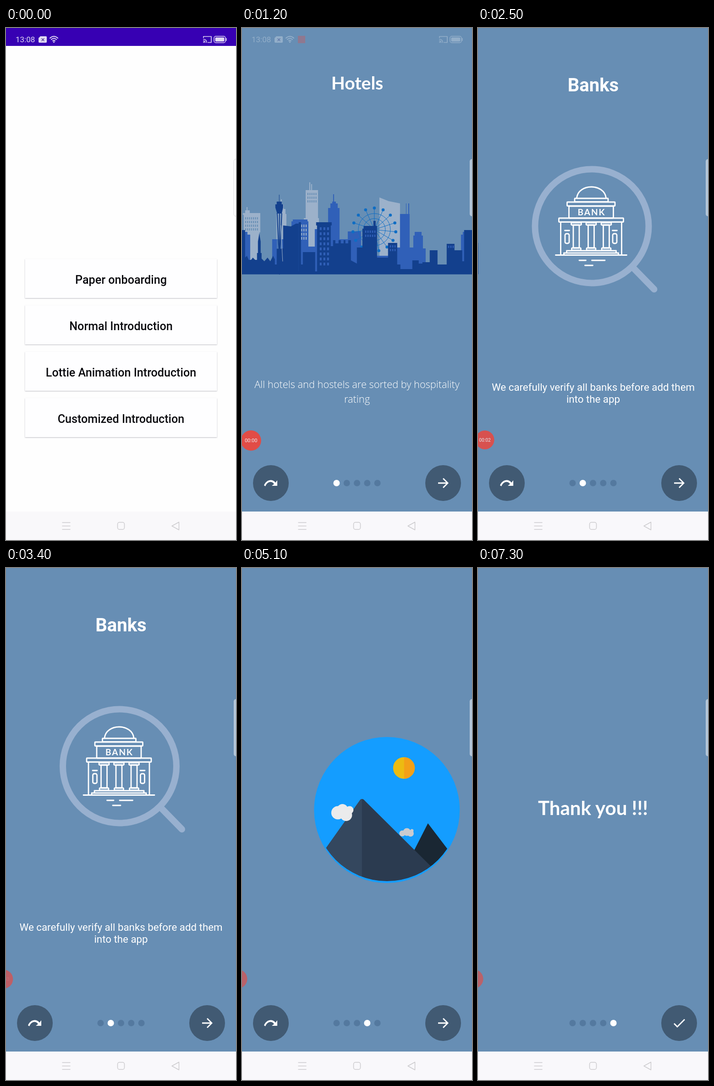
Write an HTML page that moves like this. It is 502 px wide and 1115 px high and loops after 8000 ms.

```html
<!DOCTYPE html>
<html lang="en">
<head>
<meta charset="utf-8">
<title>Onboarding</title>
<style>
  html, body { margin: 0; width: 100%; height: 100%; overflow: hidden; background: #fefefe; }
  svg { display: block; width: 100%; height: 100%; }
  text { font-family: Roboto, sans-serif; }
  .mid { text-anchor: middle; }
  .menu { font-size: 25.1px; font-weight: 500; fill: #0b0b0f; }
  .title { font: bold 40px Roboto, sans-serif; fill: #fff; }
  .hind { font-family: Lato, sans-serif; }
  .body { font-size: 22.3px; fill: #fff; }
  .light { font: 300 21.8px "Open Sans", sans-serif; fill: #fff; }
  .card { fill: #fefeff; filter: drop-shadow(0 1.5px 1.2px rgba(40, 40, 60, .32)); }
  .line { fill: none; stroke-linecap: round; stroke-linejoin: round; }
</style>
</head>
<body>
<svg id="stage" viewBox="0 0 502 1115" preserveAspectRatio="none"></svg>
<script>
const W = 502, LOOP = 8000, BLUE = '#678eb4';
const LIGHT = '#9cb1ca', MID = '#3060b8', DARK = '#13408d', WHEEL = '#0e6dc4';
const SCROLLS = [2050, 3850, 4900, 6090], SCROLL_MS = 600;

const $ = id => document.getElementById(id);
const clamp = v => Math.min(1, Math.max(0, v));
const span = (t, from, to) => clamp((t - from) / (to - from));
const easeOut = (p, power) => 1 - (1 - p) ** power;
const list = (n, fn) => Array.from({ length: n }, (_, i) => fn(i)).join('');

const rect = (x, y, w, h, fill, extra = '') =>
  `<rect x="${x}" y="${y}" width="${w}" height="${h}" fill="${fill}" ${extra}/>`;
const disc = (x, y, r, fill, extra = '') =>
  `<circle cx="${x}" cy="${y}" r="${r}" fill="${fill}" ${extra}/>`;
const line = (d, stroke, width, extra = '') =>
  `<path class="line" d="${d}" stroke="${stroke}" stroke-width="${width}" ${extra}/>`;
const shape = (d, fill) => `<path d="${d}" fill="${fill}"/>`;
const label = (x, y, cls, text) => `<text x="${x}" y="${y}" class="${cls}">${text}</text>`;
const grid = (x, y, cols, rows, dx, dy, w, h, fill) =>
  list(cols * rows, i => rect(x + i % cols * dx, y + Math.floor(i / cols) * dy, w, h, fill));

// Menu screen
function menuScreen() {
  const names = ['Paper onboarding', 'Normal Introduction',
    'Lottie Animation Introduction', 'Customized Introduction'];
  return rect(0, 0, W, 1115, '#fefefe') + rect(0, 0, W, 39, '#3700b3') +
    names.map((name, i) => {
      const y = 503 + i * 101;
      return rect(41.5, y, 419, 85, '#fefeff', 'class="card"') +
        (i === 2 ? rect(42, y, 418, 85, '#000', 'id="press" opacity="0"') : '') +
        label(251, y + 53.5, 'mid menu', name);
    }).join('') + rect(0, 1053, W, 62, '#f9f8fa');
}

// Skyline: three layers that wrap at the stage width
function farLayer() {
  return shape('M35 536V405H38V394H42V384H45V373H47V384H51V394H55V405H57V536Z' +
    'M95 536V414H99V353H107V336H109V353H111V340H113V353H126V414H128V536Z' +
    'M260 496V369L280 377L305 382V496Z' +
    'M463 536V445H466V407H464V403H469V397H472V390H474V397H479V403H502V445H500V536Z', LIGHT) +
    grid(103, 359, 5, 3, 4.4, 8, 2, 5, BLUE) + grid(469, 412, 7, 4, 4.3, 8, 2, 5, BLUE);
}

function midLayer() {
  const [cx, cy] = [228, 439];
  const rim = (i, r) => {
    const a = i * Math.PI * 2 / 15;
    return [cx + r * Math.sin(a), cy - r * Math.cos(a)];
  };
  return shape('M5 536V460H47V421H50V417H82V421H84V476H98V438H127V392H132V382H136V378H138V362H140' +
    'V378H144V382H148V392H152V460H170V443H199V496H268V478H284V405H297V382H298V405H302V382H304V405' +
    'H305V478H313V452H316V444H331V452H334V480H340V536H394V491H404V510H417V450H421V444H432V450' +
    'H437V444H453V450H459V536Z', MID) +
    grid(54, 428, 6, 4, 4.8, 9, 2.2, 6, LIGHT) +
    list(15, i => line(`M${cx} ${cy}L${rim(i, 47)}`, WHEEL, 1)) +
    [35, 24].map(r => disc(cx, cy, r, 'none', `stroke="${WHEEL}" stroke-width="1"`)).join('') +
    list(15, i => disc(...rim(i, 47), 3.3, WHEEL)) + disc(cx, cy, 4, WHEEL);
}

function nearLayer() {
  return shape('M0 536V423H5V515H9V488H36V530H40V430H38V423H72V430H70V475H75V462H80V469H87V462H92' +
    'V469H98V462H102V469H108V462H114V506L127 513V478H139V437H142V431H163V420H168V431H171V500H195V468' +
    'H215V515H222V525H248V506H262V513H270V510H286V484H303V515H323V470H340V484H357V508H361V440H385' +
    'V500L389 496L393 505H398L402 500L407 505H411V490H413V465L416 447L419 465V490H421V502L427 508' +
    'L434 500L440 508L446 496L450 504V515H454V480H468V430L485 432L496 426H502V536Z', DARK) +
    grid(46, 434, 3, 8, 8, 11, 4, 6, MID) + grid(145, 441, 5, 2, 5, 9, 2.5, 5, MID) +
    grid(199, 473, 3, 2, 5, 8, 2.5, 5, MID) + grid(326, 474, 3, 1, 5, 8, 2.5, 5, MID) +
    rect(454, 404, 12, 77, BLUE, 'opacity=".45"') +
    line('M455 404L458 470L462 510M465 404L462 470L458 510M460 404V536', DARK, 2) +
    line('M463 430L467 508', LIGHT, 1) +
    shape('M459 378V363H460V378H465V384H468V391L465 404H455L451 391V384H454V378Z', DARK);
}

function hotelsPage() {
  const layer = (id, content) => `<g id="${id}"><g id="${id}Tile">${content}</g>` +
    `<use href="#${id}Tile" x="${-W}"/></g>`;
  return `<g clip-path="url(#pageClip)">${layer('far', farLayer())}${layer('mid', midLayer())}` +
    `${layer('near', nearLayer())}${rect(0, 530, W, 6.5, DARK)}</g>` +
    `<text x="251.5" y="134" class="mid title hind" style="font-size:39px;font-family:Lato,sans-serif">Hotels</text>` +
    label(251, 784, 'mid light', 'All hotels and hostels are sorted by hospitality') +
    label(251, 816, 'mid light', 'rating');
}

function banksPage() {
  const box = (x, y, w, h, r = 1) => rect(x, y, w, h, 'none', `rx="${r}"`);
  const columns = [214, 246.5, 279.5].map(x =>
    box(x - 11, 424, 22, 5, 2) + box(x - 6.5, 429, 13, 50) + box(x - 10, 479, 20, 5, 2)).join('');
  const windows = [194, 298].map(x =>
    box(x - 4.5, 448, 9, 21, 3) + `<path d="M${x - 5} 441H${x + 5}"/>`).join('');
  return disc(248, 431.5, 124, 'none', 'stroke="#98b0cf" stroke-width="14"') +
    line('M338 522L384 569', '#98b0cf', 14) +
    `<g class="line" stroke="#fff" stroke-width="2.8">` +
    '<path d="M215 370C219 338 275 338 279 370"/>' +
    box(210.5, 371, 73, 7.5) + box(194, 379, 104.5, 8.5) + box(198, 388, 97, 26) +
    box(176, 414, 141, 8.5) + columns + windows +
    '<path d="M180 423V494M313 423V494M193 485H301V489M187 490H306V494M193 485V489M187 490V494' +
    'M169 494.5H324M220.5 506H235M248 506H276.5M233 517H250"/></g>' +
    `<text x="247.5" y="408" class="mid" fill="#fff" style="font:bold 19px Lato,sans-serif;letter-spacing:2px">BANK</text>` +
    label(251, 138, 'mid title', 'Banks') +
    label(251, 790, 'mid body', 'We carefully verify all banks before add them') +
    label(251, 816, 'mid body', 'into the app');
}

function targetPage() {
  return disc(251, 520.5, 83.5, 'none', 'stroke="#000" stroke-width="4"') +
    disc(251, 520.5, 39.5, 'none', 'stroke="#000" stroke-width="2"') + disc(251, 520.5, 3, '#000') +
    line('M251 418V437M251 604V623M148 520.5H167M335 520.5H354', '#000', 4) +
    disc(0, 0, 9.3, '#0420c8', 'id="shot"');
}

function mountainPage() {
  return disc(251, 527, 159, '#149dff') + disc(288, 435.5, 23.5, '#ecbb12') +
    shape('M288.500 412A23.500 23.500 0 0 1 288.500 459Z', '#f3a018') +
    `<g clip-path="url(#hillClip)">` +
    shape('M340.500 556L400 634L346 690L290 655Z', '#1a2733') +
    `<g id="cloudFar" fill="#cbcbcf"><circle cx="279" cy="578" r="6.500"/><circle cx="289" cy="575" r="8.500"/>` +
    `<circle cx="297" cy="578" r="7"/><circle cx="300" cy="572" r="3.500"/></g>` +
    shape('M197 503Q193 503 191 507L100 635V700H197Z', '#34475e') +
    shape('M196.500 503Q200 503 203 507L400 702H196.500Z', '#2b3b50') + '</g>' +
    `<g id="cloudNear" fill="#ebebec"><circle cx="151" cy="533" r="14.500"/><circle cx="161" cy="526" r="12"/>` +
    `<circle cx="169" cy="538" r="13"/><circle cx="176.500" cy="527" r="8.500"/></g>`;
}

const thanksPage = () =>
  `<text x="251" y="538" class="mid title" style="font:bold 42px Lato,sans-serif">Thank you !!!</text>`;

function controls() {
  const button = (x, id, icon) => `<g id="${id}">${disc(x, 991, 39, '#415a73')}${icon}</g>`;
  return button(63, 'skip', shape('M48 996C53 983 67 981 73 990L77 985V997H65L70 993C64 985 55 988 51 998Z', '#fff')) +
    button(439, 'next', `<g fill="none" stroke="#fff" stroke-width="2.800"><path id="arrow" d="M428 991H449M439 981L449 991L439 1001"/>` +
      `<path id="check" d="M428 992L435 999L451 983"/></g>`) +
    list(5, i => disc(206.4 + i * 22.3, 991, 7, '#54799f', `id="dot${i}"`));
}

function statusIcons() {
  return `<g id="status" fill="#fff" opacity=".85">` +
    `<text x="21" y="31" font-size="17">13:08</text>` +
    shape('M75 18H87Q89 18 89 20V30Q89 32 87 32H73Q71 32 71 30V22Z', '#fff') +
    line('M78 23L83 28M83 23L78 28', '#5a4a90', 1.6) +
    line('M96 22Q104.500 14.500 113 22M99 25Q104.500 20 110 25M102 28Q104.500 26 107 28', '#fff', 2) + disc(104.5, 30.5, 1.6, '#fff') +
    line('M431 21V18.500H448V31.500H441M431 24.500Q438 25 438 31.500M431 28Q434.500 28 434.500 31.500', '#fff', 1.7) + disc(431.5, 31, 1.2, '#fff') +
    rect(454, 18, 25, 14, 'none', 'rx="4" stroke="#fff" stroke-width="1.500"') +
    rect(456.5, 20.5, 20, 9, '#fff', 'rx="2"') + rect(480, 22, 1.5, 6, '#fff') +
    rect(122, 17, 16, 16, '#f44336', 'id="recIcon"') + '</g>';
}

function navIcons() {
  return line('M123 1077H140M123 1084.500H140M123 1092H140M377.500 1076V1093L362 1084.500Z', '#cdcccf', 1.5) +
    rect(243.5, 1076.5, 15, 15.5, 'none', 'rx="4" stroke="#cdcccf" stroke-width="1.500"');
}

$('stage').innerHTML =
  `<defs><clipPath id="pageClip">${rect(0, 0, W, 1053, '#000')}</clipPath>` +
  `<clipPath id="hillClip">${disc(251, 524, 158, '#000')}</clipPath></defs>` +
  `<g id="menu">${menuScreen()}</g>` + rect(0, 0, W, 1115, '#000', 'id="dim"') +
  `<g id="intro">${rect(0, 0, W, 1115, BLUE)}<g id="pager">` +
  [hotelsPage, banksPage, targetPage, mountainPage, thanksPage]
    .map((page, i) => `<g id="page${i}" transform="translate(${i * W})">${page()}</g>`).join('') +
  `</g>${controls()}${rect(0, 1053, W, 62, '#f9f8fb')}</g>` +
  statusIcons() + navIcons() +
  rect(497, 285.5, 12, 124.5, '#fff', 'id="handle" rx="5" stroke-width="1"') +
  `<g id="bubble">${disc(0, 0, 25, '#f44336')}<text id="clock" class="mid" y="4.500" font-size="12.500" fill="#fff"></text></g>`;

const move = (id, x, y = 0, scale = 1) =>
  $(id).setAttribute('transform', `translate(${x} ${y}) scale(${scale})`);
const set = (id, name, value) => $(id).setAttribute(name, value);
const show = (id, on) => set(id, 'visibility', on ? 'visible' : 'hidden');

function drawIntro(t) {
  const slide = easeOut(span(t, 400, 880), 2);
  move('menu', -50 * slide);
  set('dim', 'opacity', 0.15 * slide);
  set('press', 'opacity', 0.08 * span(t, 100, 300) * (1 - span(t, 450, 700)));
  move('intro', W * (1 - slide));
  show('intro', slide > 0);
  set('handle', 'fill-opacity', slide > 0 ? 0.5 : 0.9);
  set('handle', 'stroke', slide > 0 ? 'none' : '#dddde0');

  const page = SCROLLS.filter(start => t >= start).length;
  const position = SCROLLS.reduce((sum, start) =>
    sum + easeOut(span(t, start, start + SCROLL_MS), 5), 0);
  move('pager', -position * W);
  for (let i = 0; i < 5; i++) {
    set('dot' + i, 'fill', i === page ? '#fff' : '#54799f');
    show('page' + i, Math.abs(i - position) < 1 && slide > 0);
  }
  show('skip', slide > 0 && page < 4);
  show('arrow', slide > 0 && page < 4);
  show('check', slide > 0 && page === 4);
}

function drawScenes(t) {
  const s = (t - 1700) / 1000;
  const speeds = { far: 80, mid: 122, near: 248 };
  for (const id in speeds) move(id, ((-speeds[id] * s) % W + W) % W);

  const shot = Math.min(1, (t - 4000) / 900);
  move('shot', 90 + 161 * shot, 671 - 150.5 * shot);

  const drift = (t - 5800) / 1000;
  move('cloudNear', 10 * drift);
  move('cloudFar', -8 * drift);
}

function drawOverlays(t) {
  set('status', 'opacity', 0.85 * (1 - span(t, 1000, 1300)));
  show('recIcon', t >= 300);

  const dock = easeOut(span(t, 1000, 1500), 2);
  const hide = easeOut(span(t, 3100, 3600), 2);
  show('bubble', t >= 200);
  move('bubble', 28 - 13 * dock - 24 * hide, 901 - 4 * dock - 2 * hide, 1 - 0.18 * dock);
  set('bubble', 'opacity', 1 - 0.2 * dock - 0.22 * hide);
  set('clock', 'opacity', 1 - hide);
  const seconds = Math.max(0, Math.floor((t - 400) / 1000));
  $('clock').textContent = '00:' + String(seconds).padStart(2, '0');
}

function draw(t) {
  drawIntro(t);
  drawScenes(t);
  drawOverlays(t);
}

const begin = performance.now();
function tick() {
  draw((performance.now() - begin) % LOOP);
  requestAnimationFrame(tick);
}
draw(0);
requestAnimationFrame(tick);
</script>
</body>
</html>
```
